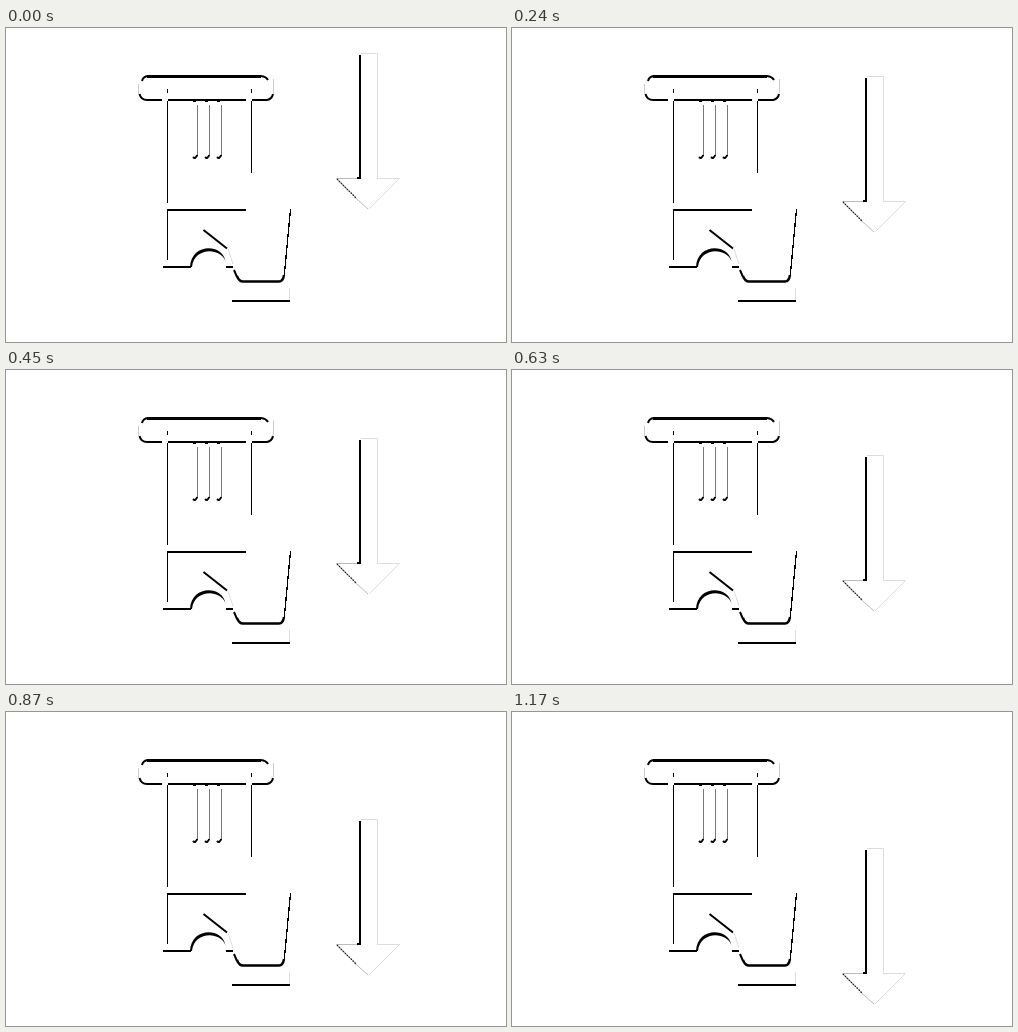
Write an HTML page that moves like this. It is 500x314 px and loops after 1200 ms.

```html
<!DOCTYPE html>
<html>
<head>
<meta charset="utf-8">
<style>
html, body { margin: 0; width: 100%; height: 100%; overflow: hidden; background: #fff; }
svg { display: block; }
</style>
</head>
<body>
<svg width="500" height="314" viewBox="0 0 500 314" fill="none" stroke="#000">
  <!-- rounded cap -->
  <path stroke-width="3" d="M141 48.500H255"/>
  <path stroke-width="2" d="M136 53Q137 48.500 142 48M255 48Q260 48.500 262 52M133.500 66Q135 72 141 72H156M162 72H240M246 72H261Q266 71 267 66"/>
  <path stroke="#ccc" d="M132.500 56V66M267.500 51V65"/>
  <!-- column and prongs -->
  <path d="M161.500 61V65M161.500 73V175M245.500 61V65M245.500 73V145M161.500 181V232"/>
  <path stroke="#777" d="M191.500 77V128M203.500 77V128M215.500 77V128"/>
  <path stroke-width="2" d="M187 129Q189.500 131.500 191.200 127M199 129Q201.500 131.500 203.200 127M211 129Q213.500 131.500 215.200 127M187 73h3M199 73h3M211 73h3"/>
  <!-- base -->
  <path stroke-width="2" d="M161 182H240M157 239H185M220 239H227M226 273H284M197.500 202L221 220.500M228 242L231 249"/>
  <path fill="#000" stroke="none" d="M184 239C185 215 216 215 219.500 233C214 219 188 219 186 239Z"/>
  <path stroke="#ddd" d="M222 221L227 236M283.500 260V272"/>
  <path stroke-width="2.400" d="M231 248Q233 253.500 237 253.500H273Q277 253.500 278 247"/>
  <path stroke-width="1.300" shape-rendering="crispEdges" d="M278 248L279 240L284.500 181"/>
  <g id="arrow">
    <path stroke="#ddd" d="M355 25.500H371.500V150M371 150.500H393.500L363 181"/>
    <path stroke="#bbb" d="M331 150.500H354M348 168.500L362 181"/>
    <path stroke-width="2" d="M354 27V150M351 150H355"/>
    <path stroke="#999" d="M330.500 150.500L349 169"/>
    <path stroke="#222" stroke-width="1.400" stroke-dasharray="1.400 1.400" d="M331 151L350 170"/>
  </g>
</svg>
<script>
const arrow = document.getElementById('arrow');
const LOOP = 1200, STEP = 30, PIXELS_PER_STEP = 2.84;

function draw() {
  const step = Math.floor(performance.now() % LOOP / STEP);
  arrow.setAttribute('transform', `translate(0 ${Math.round(step * PIXELS_PER_STEP)})`);
  requestAnimationFrame(draw);
}
draw();
</script>
</body>
</html>
```
